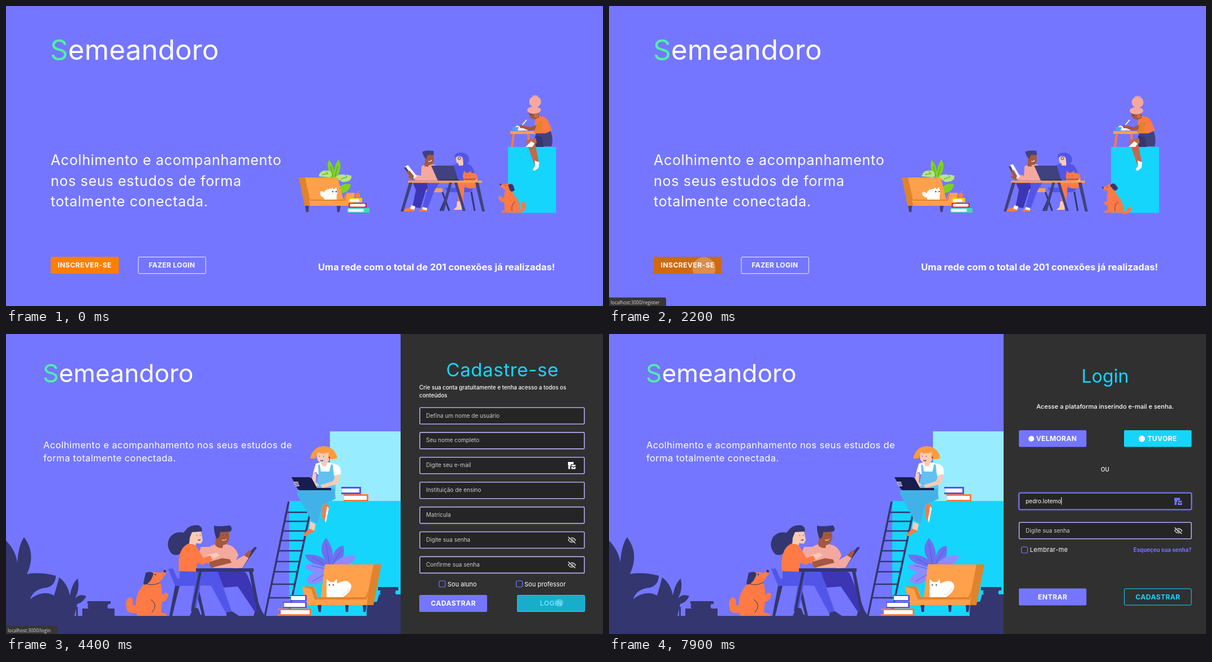
These frames come from a looping animation (1056 by 530 pixels, 8000 ms). An HTML page:

```html
<!DOCTYPE html>
<html lang="pt-BR">
<head>
<meta charset="utf-8">
<title>Semeandoro</title>
<style>
html,body{margin:0;width:100%;height:100%;overflow:hidden;background:#7476ff}
svg{display:block;width:1056px;height:530px;font-family:Inter,sans-serif;font-optical-sizing:none;fill:#fff;color:#fff}
.cut{animation:8s step-end infinite}
.ease{animation:8s linear infinite}
.sway{animation:8s ease-in-out infinite}
#home{animation-name:home}#scene{animation-name:scene}#reg{animation-name:reg}#login{animation-name:login}
@keyframes home{0%{opacity:1}28.75%,100%{opacity:0}}
@keyframes scene{0%{opacity:0}28.75%,100%{opacity:1}}
@keyframes reg{0%{opacity:0}28.75%{opacity:1}56.25%,100%{opacity:0}}
@keyframes login{0%{opacity:0}56.25%,100%{opacity:1}}
/* hover, ripple, focus */
#h1{animation-name:h1}#h2{animation-name:h2}#h3{animation-name:h3}#h4{animation-name:h4}#go{animation-name:go}
@keyframes h1{0%,12%{opacity:0}14.5%,17.6%{opacity:1}20%,100%{opacity:0}}
@keyframes h2{0%,20.6%{opacity:0}23.1%,100%{opacity:1}}
@keyframes h3{0%,46.9%{opacity:0}49.4%,100%{opacity:1}}
@keyframes h4{0%,56.3%{opacity:0}58.75%,66%{opacity:1}68.5%,100%{opacity:0}}
@keyframes go{0%,46.9%{fill:#16d5fc}49.4%,100%{fill:#5fe3fb}}
#r1{animation-name:r1}#r2{animation-name:r2}
@keyframes r1{0%,25.65%{r:0}28.75%,100%{r:34px}}
@keyframes r2{0%,53.8%{r:0}56.25%,100%{r:14px}}
#u1{animation-name:u1}#u2{animation-name:u2}
@keyframes u1{0%,16.9%{opacity:0}18.1%,21.2%{opacity:1}21.25%,49%{opacity:0}52%,57.45%{opacity:1}57.5%,100%{opacity:0}}
@keyframes u2{0%,21.2%{opacity:0}21.25%,30.5%{opacity:1}33.75%,57.45%{opacity:0}57.5%,68%{opacity:1}71.25%,100%{opacity:0}}
#ring{animation-name:ring}#mail{animation-name:mail}#hint{animation-name:hint}
@keyframes ring{0%{opacity:0}71.25%,100%{opacity:1}}
@keyframes mail{0%{color:#fff}71.25%,100%{color:#7476ff}}
@keyframes hint{0%{opacity:1}80%,100%{opacity:0}}
/* figures */
#head{animation-name:bob}
@keyframes bob{0%{transform:translate(2px,-2px)}11.25%,22.5%{transform:none}27.5%,100%{transform:translate(1px,-1px)}}
#pen{animation-name:pen;transform-origin:911px 213px}
@keyframes pen{0%,10%,20.5%,27.5%,100%{transform:none}5%,16.25%,24%{transform:rotate(-14deg)}}
.wag{animation-name:wag;transform-origin:var(--o)}
@keyframes wag{0%,16.25%{transform:none}8.75%,27.5%,100%{transform:rotate(var(--a))}}
.n{fill:#34366f}.n2{fill:#40427f}.o{fill:#ff7a45}.lo{fill:#ffa04c}.do{fill:#e0832c}.p{fill:#f5a99e}.br{fill:#a5583d}
.sk{fill:#fbcab4}.b{fill:#5256e8}.db{fill:#3c36b4}.c{fill:#16d5fc}.v{fill:#7476ff}.gr{fill:#7ed321}.lg{fill:#b5e67f}.g{fill:#4ff0a8}
.ln{fill:none;stroke:#34366f}.w{fill:none;stroke:#fff}
.bt{font-weight:700;font-size:12px;letter-spacing:.5px;text-anchor:middle}
.f{fill:#252525;stroke:#b3abee;stroke-width:1.6}
.ph{font-size:10px;fill:#cdcdcd}
.ck{fill:none;stroke:#7476ff;stroke-width:1.2}
.s{font-weight:500}
.u rect{fill:#363636}.u text{font:8.1px "Open Sans",sans-serif;fill:#dcdcdc}
.out{fill:none;stroke:#16d5fc}
</style>
</head>
<body>
<svg viewBox="0 0 1056 530">
<defs>
<clipPath id="k1"><rect x="79" y="443" width="120.500" height="30" rx="2.500"/></clipPath>
<clipPath id="k2"><rect x="904" y="461" width="120" height="30" rx="2"/></clipPath>
<g id="eye"><path d="M-6.500 0Q0-8 6.500 0Q0 8-6.500 0z" fill="none" stroke="#fff" stroke-width="1.100"/><circle r="2" fill="none" stroke="#fff"/><path d="M-6-5.500L6 5.500" stroke="#252525" stroke-width="3"/><path d="M-6.500-5.500L6 5.500" stroke="#fff" stroke-width="1.200"/></g>
<g id="post" fill="currentColor"><path d="M-5-6h8v4h-5v3.500h-3.500v-1.500h-1.500v-6zM-6.500 .5l3.500 2v4h-3.500zM-1-1h7.500v1.500l-3.700 2.300-3.800-2.300zM-1 2l3.800 2.300 3.700-2.300v4.500h-7.500z"/></g>
</defs>
<rect width="1056" height="530" class="v"/>

<g id="home" class="cut">
<text x="78" y="95" font-size="49.600"><tspan class="g">S</tspan>emeandoro</text>
<g font-size="25" letter-spacing=".7"><text x="79" y="281">Acolhimento e acompanhamento</text><text x="79" y="317.500">nos seus estudos de forma</text><text x="79" y="354">totalmente conectada.</text></g>
<rect x="79" y="443" width="120.500" height="30" rx="2.500" fill="#ff7f00"/>
<rect id="h2" class="ease" x="79" y="443" width="120.500" height="30" rx="2.500" fill="#d0690f"/>
<g clip-path="url(#k1)"><circle id="r1" class="ease" cx="168" cy="464" r="0" fill-opacity=".25"/></g>
<text class="bt" x="139.200" y="462">INSCREVER-SE</text>
<rect id="h1" class="ease" x="233.500" y="443" width="120" height="30" rx="2.500" fill="#5a59a6"/>
<rect class="w" x="234" y="443.500" width="119.300" height="29.300" rx="2" stroke-width=".9"/>
<text class="bt" x="293.500" y="462" style="letter-spacing:.35px">FAZER LOGIN</text>
<text x="552" y="466.500" font-size="16.500" font-weight="700">Uma rede com o total de 201 conexões já realizadas!</text>

<!-- armchair and plant -->
<path class="gr" d="M578 304Q565 285 571 272Q582 283 580 304zM580 304Q579 283 588 271Q597 284 584 304zM585 330Q590 311 610 315Q608 330 590 331z"/>
<path class="lg" d="M553 301Q555 288 572 291Q580 296 574 303zM583 303Q588 294 611 300Q612 311 595 311z"/>
<path class="ln" style="stroke:#4b9c20" d="M559 298l11-2-5-4M592 306l11-4-3-4M578 301l-4-18M582 301l5-18"/>
<path class="lo" d="M519 303h68l10 40h-60z"/>
<path class="do" d="M518 303h11l11 50h-12z"/>
<path class="lo" d="M536 342h61l4-12h16l-3 23h-76z"/>
<path class="do" d="M537 342h61l3-12 2 0-3 14h-62z"/>
<path class="n2" d="M529 353h7l-1 11h-4zM585 353h7l-2 11h-4z"/>
<path class="wag sway" style="--o:562px 336px;--a:-18deg" d="M566 339Q554 338 556 328Q561 325 564 333z"/>
<path d="M563 342q-5-17 9-19h4l0-3 4 4 4-4 2 10q-2 5-1 12z"/>
<path class="n" d="M577 327h2v2h-2zM583 327h2v2h-2z"/>
<rect x="606" y="339" width="24" height="8" rx="1" fill="#f4c71d"/><rect x="608" y="341" width="17" height="5" rx="2"/>
<rect x="606" y="348" width="32" height="8" rx="1" fill="#cf1f3d"/><rect x="608" y="349.500" width="28" height="5" rx="2"/>
<rect x="604" y="357" width="39" height="8" rx="1" fill="#43d9b0"/><rect x="605" y="358.500" width="28" height="5" rx="2"/>
<circle class="o" cx="622" cy="334.500" r="4.500"/><path class="gr" d="M622 330q1-4 4-3z"/>

<!-- two people at a table -->
<path class="lo" d="M733 322h39v7h-39z"/><path class="b" d="M775 321h52q-3 8-12 8h-33z"/>
<path d="M783 328L768 362M772 329l12 33M823 328l6 34" class="ln" stroke-width="3"/>
<path class="db" d="M719 311h40l-16 14-10 32-14-2 6-30z"/><path class="b" d="M745 312h22l-9 14-13 34-9-2 10-38z"/>
<path class="o" d="M702 363q4-7 14-7l7 2-1 5zM731 363q2-6 9-5l6 1-1 4z"/><path d="M717 352l7 2-2 6-7-2zM737 355l8 2-1 4-8-2z"/>
<path class="p" d="M735 283q10-5 22-3 8 2 10 28h-42l-7-5 4-6 12 3z"/>
<path class="br" d="M741 262h15l1 11q-2 8-9 8l-1 3-7-1 1-8zM768 308l-2-8 11-1 10 6v3zM713 300l9 2-2 6-9-6z"/>
<path class="n2" d="M736 258q6-4 20-2l1 7q-8 0-12 1l-1 6q-5-2-7-10z"/><path class="w" stroke-width="1.200" d="M747 274q4 2 6-2"/>
<g class="wag sway" style="--o:722px 303px;--a:9deg"><path d="M705 284l6-3 16 20-8 5z"/><path class="n2" d="M704 286l3-2 14 20-2 2z"/><path class="br" d="M708 293l6-2 8 10-4 4z"/></g>
<path class="b" d="M788 283q13-8 32-3 9 5 11 28h-42z"/><path class="sk" d="M797 262h14l-1 14-2 6-7 0-1-4q-4-1-4-8z"/>
<path class="b" d="M793 268q0-9 11-9 12-1 15 10l0 6q-4 6-10 4l-1-10q-2-4-7-4z"/><circle cx="802" cy="269" r="2.500" class="ln"/>
<path class="o" d="M799 310h13l-4 40h-8zM808 301l2-10 4 4 5-1 4-3 0 4q11-1 11 9l-3 16q-9 5-18 0z"/>
<path class="sk" d="M798 345h9l-1 15h-15l6-5zM829 308l5-3-3 10z"/><path class="ln" d="M813 300h1m5 0h1m-9 6h20"/>
<path class="n2" d="M752 282h38q2 0 3 2l7 25h-36z"/><path class="n" d="M766 306h35v3h-35z"/>
<path class="lo" d="M711 308.500h131v4h-131z"/>
<path class="n2" d="M713 312h6l-16 51h-5zM830 312h6l11 51h-5zM784 312h5l-14 50h-5zM793 312h5l15 50h-5z"/>

<!-- girl writing on a cube -->
<path class="c" d="M888 249h85v116.500h-85z"/>
<path class="lo" d="M892 221h44v5h-44z"/><path class="o" d="M896 226h4l-3 23h-4zM922 226h4l1 20h-4z"/>
<path class="n2" d="M941 219h22q6 18 2 29h-25l-7-11z"/><path class="n" d="M937 228l11 4 3 17h-15z"/>
<path d="M923 247l13-4 6 31-1 8-7-3z" fill="#c0694f"/><path d="M919 238l18-5 2 9-15 6z" fill="#c0694f"/>
<path d="M935 273l8 3-1 10-7 5q-4 0-3-3l4-6zM919 249l10-10 6 4-4 6z"/>
<path class="o" d="M938 196q12-4 20 5l8 19-12 5h-15l-5-2 2-20z"/><path class="br" d="M941 209l-5 10-20 2-8-3 5-7 15 3z"/><path class="do" d="M940 205l10-2-4 18-12 3z"/>
<g id="head" class="sway"><path class="br" d="M922 186h18l1 13-7 3q-10-1-11-8z"/>
<ellipse class="p" cx="934" cy="171" rx="10.500" ry="10"/><ellipse class="p" cx="932" cy="186" rx="12" ry="6.500"/>
<circle class="o" cx="936" cy="196" r="2.800"/><circle class="br" cx="936" cy="196" r="1.500"/><path class="ln" d="M929 161q5-2 10 0" style="stroke:#f5a99e"/><path class="ln" d="M925 194h3"/></g>
<path d="M897 217l7-6 20 9h-18z"/><path d="M895 214h12l-2 6h-8z" fill="#46a9ea"/>
<path id="pen" class="w sway" stroke-width="1.800" d="M911 213l10-12"/><circle class="br" cx="912" cy="213" r="3"/>

<!-- dog -->
<path class="o wag sway" style="--o:907px 361px;--a:45deg" d="M903 365q12-4 9-12-1-8 4-8 5 6 2 14-4 7-15 6z"/>
<path class="o wag sway" style="--o:884px 340px;--a:-65deg" d="M886 345l-8 2-7-6 1-5q5-1 6 4l7-5z"/>
<path class="o" d="M883 325l11 0q4 9 11 17 11 23-2 23h-27q0-4 6-4-1-18-1-27z"/>
<path class="ln" d="M895 362q-2-12 6-16" stroke-width=".8"/><path class="o" d="M876 365q1-4 8-4l5 4zM897 365q2-6 12-5l3 5z"/>
<g class="wag sway" style="--o:890px 322px;--a:-20deg"><path class="o" d="M874 314l7 1q6-3 12 0l5 11q-6 4-14 2-2-5-9-8z"/><path class="n" d="M888 316q8-4 10 3l2 6q-6 6-9 0zM873 314l4 0-2 4z"/><circle class="n" cx="883" cy="317" r=".8"/></g>
</g>

<g id="scene" class="cut">
<rect width="1056" height="530" class="v"/>
<text x="65" y="85" font-size="44.300"><tspan class="g">S</tspan>emeandoro</text>
<g font-size="16.500" letter-spacing=".37"><text x="66" y="202">Acolhimento e acompanhamento nos seus estudos de</text><text x="66" y="225">forma totalmente conectada.</text></g>
<path d="M573 172h125v124h-125z" fill="#97edff"/><path class="c" d="M501 295h197v204h-197z"/>
<!-- garden -->
<path class="n" d="M0 365Q17 382 20 404Q22 373 32 359Q54 388 37 424Q60 420 88 427Q88 443 73 448Q49 450 43 468Q66 451 85 462Q91 442 94 430Q109 441 113 462Q117 440 127 432Q131 452 122 467Q131 458 142 463Q137 474 126 477L121 498H0z"/>
<path class="v" d="M43 469Q57 452 82 454Q86 446 87 440Q79 449 65 450Q47 454 43 469z"/>
<path class="n" d="M124 482h3v16h-3zM144 472h41v5h-4q-3 4 0 8h11v13h-57v-13h11q-3-4 0-8h-2zM658 447h36v6h-4q-3 4 0 7h8v38h-60q-1-10 2-24l16-1q2-5 4-13h3q-3-4 0-7h-5z"/>
<path class="n" d="M0 498h698v32H0z"/>
<!-- ladder -->
<path class="ln" stroke-width="3.500" d="M500 296L458 498M542 296L499 498"/>
<path class="ln" stroke-width="2.500" d="M496 315h42M492 331h42M489 348h42M485 365h42M481 383h42M477 402h42M474 420h42M470 442h42M465 466h41"/>
<!-- girl with a laptop -->
<path class="o" d="M560 301h10l1 7-5 25-7-9z"/><path d="M568 304l3 4-5 25-2-3z"/>
<path d="M556 230h22l5 42-2 20-20 10-10 31-13-4 7-36 3-24z" fill="#62c1f0"/>
<path d="M581 273Q546 270 522 274Q510 277 517 287L540 329 551 335 560 302 583 291z" fill="#41b2e8"/>
<path class="sk" d="M538 331l10 5-3 13-9-3z"/><path class="o" d="M525 357q5-9 12-13l9 4-4 3q-5-1-10 6z"/>
<path d="M548 229l10-3 14 1 14 4q8 4 6 17l-11 2-3-6-4 4h-23l-2-4-6 2z"/>
<path d="M552 231l3 0 2 12h15l3-13 3 1 4 40h-34l5-23z" fill="#62c1f0"/>
<path class="sk" d="M584 249l8-1-5 17-27 7-4-5 22-7zM543 246l6 0-1 16 6 5-6 3-8-7zM550 209h22l-1 15-3 3q0 7-5 7t-6-7q-6-1-7-8z"/>
<path d="M538 220Q542 199 563 198Q582 200 586 219Q578 223 570 220L571 209Q558 214 551 208Q550 217 547 220z" fill="#ff9b3d"/>
<path class="ln" d="M554 216h1m6 0h1m-6 7q3 2 5 0" stroke-width="1.500"/><circle class="n" cx="572" cy="218" r="1.200"/>
<path d="M505 253h31q4 0 6 4l8 15h25v4h-55q-3 0-5-4z" fill="#191c4e"/><path class="w" stroke-width="1.300" d="M509 262h8m-7 3h8m-6 3h7"/>
<!-- books on the block -->
<path class="b" d="M593 270h35v13h-35v-3h28v-7h-28z"/><path d="M595 273h30v7h-30z"/><path class="o" d="M597 283h44v13h-44v-3h36v-7h-36z"/><path d="M598 286h40v7h-40z"/>
<!-- purple plant -->
<g fill="#6d70ef"><path d="M573 408Q547 384 566 360Q584 383 575 407zM576 407Q578 376 597 374Q602 400 579 409zM572 413Q533 407 529 390Q560 387 575 410z"/></g>
<g fill="#8b8cff"><path d="M578 408Q596 387 620 392Q614 409 584 413zM571 417Q541 398 528 411Q539 426 568 419zM568 421Q538 416 531 436Q548 453 570 425z"/></g>
<path class="ln" style="stroke:#5256e8" d="M572 406L566 370M578 405L594 381M570 416l-30-7M566 423l-24 14M572 412l-30-17"/>
<!-- armchair, cat, books -->
<path class="lo" d="M564 407h87l-14 72h-82z"/><path class="do" d="M650 407h14l-14 72h-14z"/>
<path class="lo" d="M524 446h21l7 19h88l-2 14h-108z"/><path class="do" d="M524 446h20l7 19h85l4-13-2 17h-92l-6-18z"/>
<path class="n" d="M551 479h7l-1 12h-4zM600 479h6l-1 12h-4zM631 479h7l-2 12h-4z"/>
<path d="M567 465l0-32 6 5h7l5-5 1 8q20-11 25 4 0 10-15 20z"/><path class="n" d="M570 443l3-1v3zM577 443l3-1v3z"/><path class="ln" d="M594 461q10-3 12-12" style="stroke:#d5d7ea"/>
<path class="b" d="M502 461h30v11h-30v-2h25v-7h-25z"/><path d="M504 463h25v7h-25z"/><path class="b" d="M490 473h42v11h-42v-2h35v-7h-35z"/><path d="M492 475h37v7h-37z"/><path class="o" d="M481 485h59v13h-59v-3h6v-7h-6z"/><path d="M486 488h51v7h-51z"/>
<!-- couple -->
<path class="b" d="M287 415l8-1 8 18h38v13h-42z"/><path class="n" d="M299 445h8l-13 53h-5zM334 445h6l12 53h-5z"/>
<path class="db" d="M374 420h46q5 0 7 6l25 62-11 4-31-46-25 2z"/>
<path class="b" d="M307 419h61q9 0 9 8l23 65-10 3-27-50-19-1-8 43-9-2 7-42-27-7z"/>
<path class="n" d="M325 498l7-15 8 2 4 11 6 0v2zM390 498v-6l10-2 12 8zM438 498l2-7 11-4 7 11z"/>
<path d="M430 420h6l15 78h-5zM341 420h5l-14 70h-5z" class="n"/>
<path class="p" d="M360 376q13-9 32-4 14 3 19 19l-4 8-3 14-36 0-18-14-9-12 4-11z"/>
<path class="br" d="M369 347h25l1 13q-2 12-11 13l-1 5q-9 1-13-5l1-11zM358 403l24-7 14 2 3 6-36 9z"/>
<path class="n" d="M368 338q4 3 28 0 6 6 1 11l-18 1-2 9-4 3q-6-12-5-24z"/><path class="ln" d="M384 355h1m5 0h1" stroke-width="1.500"/><path class="w" d="M382 364q5 2 8-2"/>
<path class="n" d="M319 345q8-9 22-7 8 5 5 11l-9 2-9 11-8 13q-12 20-26 14-13-14-4-30 9-11 24-8z"/>
<path class="sk" d="M329 350l16-1 3 15-3 6q-6 1-8-1l-2 6-11-2 1-13zM356 390l14-2 4 5-12 6z"/><path class="ln" d="M337 356h1m5 0h1m-5 8q3 1 5-1" stroke-width="1.300"/>
<path class="o" d="M321 371q12-1 16 4l12 21 13-5 3 8-17 9-10-4-1 16-31-1q-4-38 15-48z"/><path class="sk" d="M361 391l11-5 6 5-12 7z"/>
<path class="n" d="M408 410l10 3 26-36-4-1z"/><path class="p" d="M400 403l25-14 4 7-11 17-16 1z"/><path class="br" d="M421 391l9-9 4 3-5 11z"/>
<path class="n" d="M336 414h102v6h-102z"/>
<!-- dog -->
<path class="o" d="M235 492Q212 496 213 482Q210 471 218 465Q227 466 224 478L235 482zM250 437l22 0q5 12 4 25 6-8 11-3-1 13-11 14l-2 19q10 1 12 6h-54q-10-39 18-61z"/>
<path class="o" d="M248 428q6-9 17-7l9 1 8-6q3 9-3 12-3 10-16 12l-13 1z"/><path class="n" d="M247 422q9-4 14 1-3 13-12 19-8 3-5-6zM279 417q5-2 4 4-3 1-5-1z"/><circle class="n" cx="264" cy="425" r="1.200"/>
<path class="ln" d="M256 469q14 9 2 23M248 441q10 5 25-2"/>
<path d="M698 0h358v530H698z" fill="#303030"/>
</g>

<g id="reg" class="cut">
<text class="c" x="878" y="75" font-size="33" letter-spacing=".6" text-anchor="middle">Cadastre-se</text>
<g class="s" font-size="9.800"><text x="731" y="97.500">Crie sua conta gratuitamente e tenha acesso a todos os</text><text x="731" y="111.500">conteúdos</text></g>
<g id="rows"></g>
<use href="#post" x="1001" y="232"/><use href="#eye" x="1001" y="364"/><use href="#eye" x="1001" y="408"/>
<rect class="ck" x="766" y="436" width="11" height="11" rx="3"/><rect class="ck" x="902.500" y="436" width="11" height="11" rx="3"/>
<g font-size="11"><text x="781" y="445.500">Sou aluno</text><text x="917" y="445.500">Sou professor</text></g>
<rect class="v" x="731" y="461" width="120" height="30" rx="2"/><text class="bt" x="791.300" y="480">CADASTRAR</text>
<rect id="h3" class="ease" x="904" y="461" width="120" height="30" rx="2" fill="#17adcb"/>
<rect class="out" x="904.500" y="461.500" width="119" height="29" rx="2"/><g clip-path="url(#k2)"><circle id="r2" class="ease" cx="979" cy="475" r="0" fill-opacity=".25"/></g>
<text id="go" class="bt ease" x="964.300" y="480">LOGIN</text>
</g>

<g id="login" class="cut">
<text class="c" x="877.500" y="85.500" font-size="32" text-anchor="middle">Login</text>
<text class="s" x="877.500" y="132" font-size="11" text-anchor="middle">Acesse a plataforma inserindo e-mail e senha.</text>
<rect class="v" x="725" y="170" width="119.500" height="29.500" rx="2"/><circle cx="747" cy="185" r="5"/><text class="bt" x="791.500" y="189" style="letter-spacing:.3px">VELMORAN</text>
<rect class="c" x="911" y="170" width="119.500" height="29.500" rx="2"/><circle cx="942.500" cy="185" r="5.500"/><text class="bt" x="978.500" y="189" style="letter-spacing:.4px">TUVORE</text>
<text class="s" x="877.500" y="243" font-size="9.800" text-anchor="middle">OU</text>
<rect class="f" x="725.500" y="281" width="304.500" height="29" rx="2"/><rect class="f" x="725.500" y="332.800" width="304.500" height="29" rx="2"/>
<rect id="ring" class="f cut" x="725.500" y="281" width="304.500" height="29" rx="2" style="stroke:#7476ff;filter:drop-shadow(0 0 1.500px #7476ff)"/>
<text id="hint" class="ph cut" x="737" y="299">Digite seu e-mail</text><text class="ph" x="737" y="350.800">Digite sua senha</text>
<text id="typed" x="737" y="299" font-size="10"></text><rect id="caret" x="737" y="288.500" width="1" height="13"/>
<g id="mail" class="cut"><use href="#post" x="1007" y="295.500"/></g><use href="#eye" x="1007" y="347.500"/>
<rect class="ck" x="729.500" y="376" width="11" height="11" rx="3"/><text x="744.500" y="385" font-size="11" letter-spacing=".3">Lembrar-me</text>
<text class="v" x="1030.500" y="384.500" font-size="9.700" font-weight="700" text-anchor="end">Esqueçeu sua senha?</text>
<rect class="v" x="725" y="449.500" width="119.500" height="30" rx="2"/><text class="bt" x="784.800" y="469">ENTRAR</text>
<rect id="h4" class="ease" x="911" y="449.500" width="119.500" height="30" rx="2" fill="#17adcb"/>
<rect class="out" x="911.500" y="450" width="118.500" height="29" rx="2"/><text class="bt c" x="971" y="469">CADASTRAR</text>
</g>

<g id="u1" class="u ease"><rect x="-4" y="515" width="96" height="19" rx="3"/><text x="3" y="526.500">localhost:3000/login</text></g>
<g id="u2" class="u ease"><rect x="-4" y="515" width="105" height="19" rx="3"/><text x="3" y="526.500">localhost:3000/register</text></g>
</svg>
<script>
const $ = id => document.getElementById(id);
const labels = ['Defina um nome de usuário', 'Seu nome completo', 'Digite seu e-mail', 'Instituição de ensino',
  'Matrícula', 'Digite sua senha', 'Confirme sua senha'];
$('rows').innerHTML = labels.map((s, i) =>
  `<rect class="f" x="732" y="${130 + i * 43.9}" width="291" height="29" rx="2"/>` +
  `<text class="ph" x="743" y="${147.5 + i * 43.9}">${s}</text>`).join('');

const name = 'pedro.lotemo';
// time at which each letter appears
const keys = [6400, 6500, 6600, 6800, 6900, 7100, 7300, 7500, 7500, 7700, 7800, 7900];
let start = null, shown = -1;
function draw(now) {
  if (start === null) start = now;
  const t = (now - start) % 8000;
  const n = keys.filter(k => k <= t).length;
  if (n !== shown) {
    shown = n;
    $('typed').textContent = name.slice(0, n);
    $('caret').setAttribute('x', 737 + (n ? $('typed').getComputedTextLength() : 0));
  }
  $('caret').style.opacity = t >= 5700 && (t < 6200 || t >= 6400) ? 1 : 0;
  requestAnimationFrame(draw);
}
requestAnimationFrame(draw);
</script>
</body>
</html>
```
